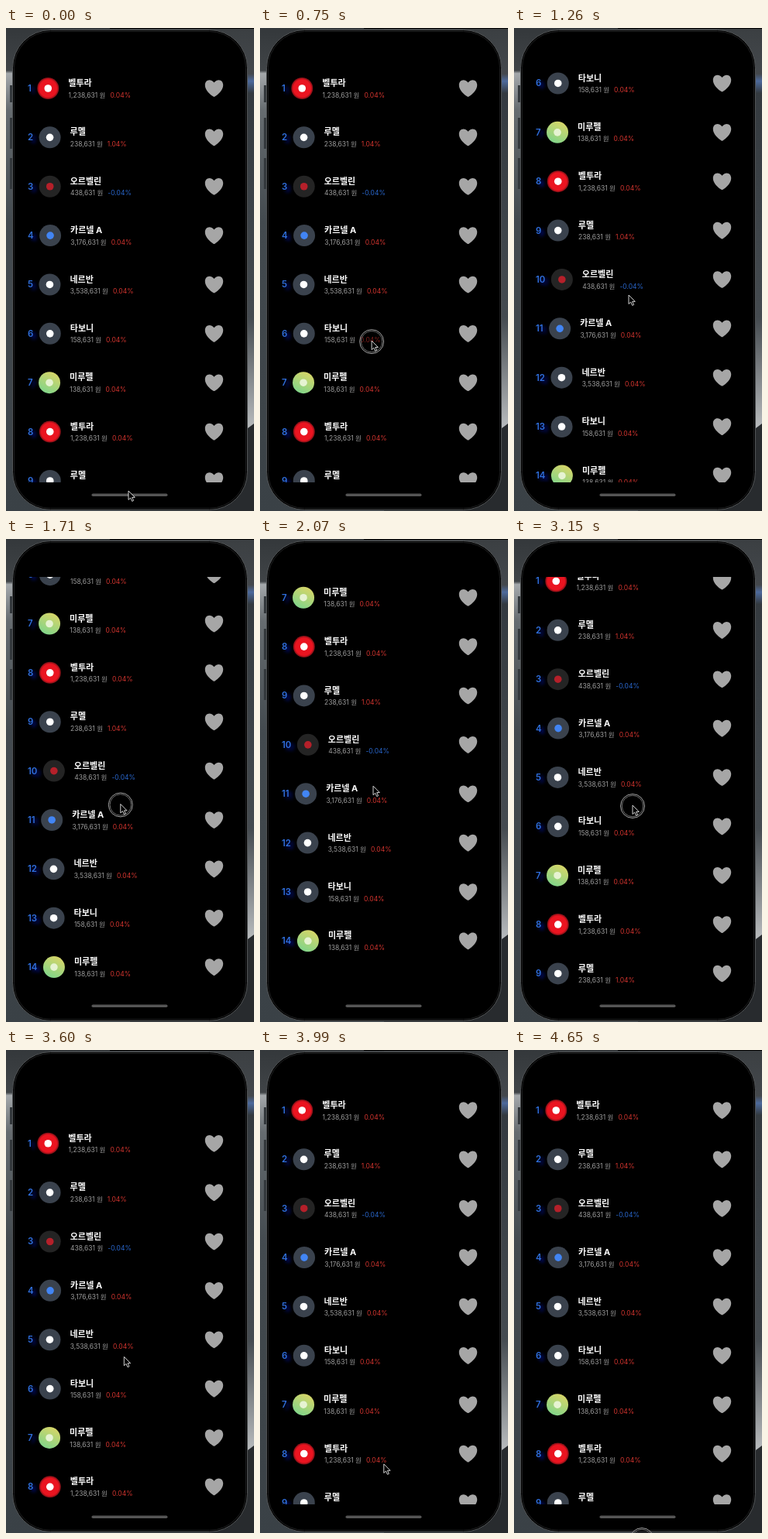
Write an HTML page that moves like this. It is 320 by 624 pixels and loops after 4.68 s.

```html
<!DOCTYPE html>
<html lang="ko">
<head>
<meta charset="utf-8">
<style>
  html, body { margin: 0; width: 100%; height: 100%; overflow: hidden; background: #000; }
  svg { display: block; width: 320px; height: 624px; }
  text { font-family: Inter, "Noto Sans CJK KR", "Noto Sans CJK", sans-serif; white-space: pre; }
  .rank { font-size: 11.5px; font-weight: 600; fill: #2f6fdc; filter: drop-shadow(4px 3px 2px #000f8c); }
  .name { font-size: 11px; font-weight: 700; fill: #fff; }
  .price { font-size: 8.5px; fill: #9c9c9c; }
  .up { fill: #d5352f; }
  .down { fill: #2a68cf; }
</style>
</head>
<body>
<svg viewBox="0 0 320 624">
  <defs>
    <linearGradient id="left" x2="0" y2="1">
      <stop offset="0" stop-color="#34383b"/><stop offset=".088" stop-color="#404447"/>
      <stop offset=".094" stop-color="#a4a8ab"/><stop offset=".17" stop-color="#666c70"/>
      <stop offset=".4" stop-color="#434a4f"/><stop offset="1" stop-color="#3a4146"/>
    </linearGradient>
    <linearGradient id="right" x2="0" y2="1">
      <stop offset="0" stop-color="#3b3f42"/><stop offset=".095" stop-color="#44484c"/>
      <stop offset=".11" stop-color="#4d6a9c"/><stop offset=".135" stop-color="#343a3f"/>
      <stop offset=".6" stop-color="#454b50"/><stop offset=".83" stop-color="#b9bcbe"/>
    </linearGradient>
    <linearGradient id="lime" x1=".8" y1="0" x2=".3" y2="1">
      <stop offset="0" stop-color="#dcd566"/><stop offset="1" stop-color="#7fd58b"/>
    </linearGradient>
    <radialGradient id="red">
      <stop offset=".8" stop-color="#ea1420"/><stop offset="1" stop-color="#7a1016"/>
    </radialGradient>
    <clipPath id="view"><path d="M10 49H310V587H10Z"/></clipPath>
  </defs>
  <path d="M0 0H160V624H0Z" fill="url(#left)"/>
  <path d="M160 0H320V624H160Z" fill="url(#right)"/>
  <path d="M300 526L320 511V624H160V600Z" fill="#282b2e"/>
  <path d="M134 0H320V1H134Z"/>
  <path d="M5 74h4v22h-4zM5 116h4v40h-4zM5 168h4v40h-4z" fill="#33383c"/>
  <rect x="8.5" y="2.5" width="303" height="620" rx="49" stroke="#55585a"/>
  <rect x="10.5" y="4.5" width="299" height="616" rx="47" stroke="#202122"/>
  <g clip-path="url(#view)"><g id="list"></g></g>
  <rect x="110.5" y="601.5" width="98" height="3.6" rx="1.8" fill="#555"/>
  <g id="pointer">
    <g id="press" fill="none">
      <circle r="15.5" fill="#000" fill-opacity=".4" stroke="#a0a0a0"/>
      <circle r="13.7" stroke="#6d6d6d"/>
    </g>
    <path d="M0 -1V10.5L2.7 8.1L4.7 12.4L6.6 11.5L4.7 7.4H8.3Z" fill="#000" stroke="#e8e8e8" stroke-width=".9"/>
  </g>
</svg>
<script>
const LOOP = 4680, ROWS = 14, PITCH = 63.37, TOP = 78, END = 346;
const byId = id => document.getElementById(id);
const list = byId('list'), pointer = byId('pointer'), press = byId('press');

const GREY = '#3a424d';
const stocks = [
  { name: '벨투라', price: '1,238,631', change: '0.04%', badge: 'url(#red)', mark: '#fff' },
  { name: '루멜', price: '238,631', change: '1.04%', badge: GREY, mark: '#fff' },
  { name: '오르벨린', price: '438,631', change: '-0.04%', badge: '#242424', mark: '#b5202a' },
  { name: '카르넬 A', price: '3,176,631', change: '0.04%', badge: GREY, mark: '#4285f4' },
  { name: '네르반', price: '3,538,631', change: '0.04%', badge: GREY, mark: '#fff' },
  { name: '타보니', price: '158,631', change: '0.04%', badge: GREY, mark: '#fff' },
  { name: '미루펠', price: '138,631', change: '0.04%', badge: 'url(#lime)', mark: '#e6f3d2' }
];

function row(i) {
  const { name, price, change, badge, mark } = stocks[i % stocks.length];
  return `<g transform="translate(0 ${TOP + i * PITCH})">
    <text class="rank" x="28" y="4">${i + 1}</text>
    <g class="stock">
      <circle r="14" fill="${badge}"/><circle r="4.8" fill="${mark}"/>
      <text class="name" x="26" y="-2.9">${name}</text>
      <text class="price" x="26.3" y="11.6">${price} 원<tspan dx="6" class="${change[0] === '-' ? 'down' : 'up'}">${change}</tspan></text>
    </g>
    <path transform="translate(268.5 0)" fill="#a6a6a6" d="M0 -7.5C-2 -10 -4 -10.8 -6 -10.8C-9.3 -10.8 -11.7 -8 -11.7 -4.3C-11.7 2.3 -5 8 -1 10.6Q0 11.2 1 10.6C5 8 11.7 2.3 11.7 -4.3C11.7 -8 9.3 -10.8 6 -10.8C4 -10.8 2 -10 0 -7.5Z"/>
  </g>`;
}

list.innerHTML = Array.from({ length: ROWS }, (_, i) => row(i)).join('');

// Each stock follows the width of its rank number
for (const stock of list.querySelectorAll('.stock')) {
  const width = stock.previousElementSibling.getComputedTextLength();
  stock.setAttribute('transform', `translate(${28 + width + 21.4} 0)`);
}

// Progress of a flick that speeds up, then glides to rest
function flick(t, start) {
  const u = Math.max(0, t - start) / 108;
  return 1 - (1 + u) * Math.exp(-u);
}

// Pull past the edge of the list and back
function overscroll(t, start) {
  const u = Math.min(1, Math.max(0, (t - start) / 740));
  return Math.sin(Math.PI * u) ** 2;
}

const scroll = t =>
  END * (flick(t, 783) - flick(t, 2687)) + 39 * overscroll(t, 1640) - 57 * overscroll(t, 3110);

// Stops of the pointer; `down` marks a press held on the way to that stop
const stops = [
  { t: 0, x: 158, y: 599 },
  { t: 720, x: 144, y: 411 },
  { t: 930, x: 146, y: 305, down: true },
  { t: 1250, x: 148, y: 346 },
  { t: 1640, x: 148, y: 346 },
  { t: 2000, x: 146, y: 320, down: true },
  { t: 2690, x: 147, y: 326 },
  { t: 2900, x: 156, y: 504, down: true },
  { t: 3150, x: 153, y: 345 },
  { t: 3520, x: 152, y: 391, down: true },
  { t: 4350, x: 165, y: 633 },
  { t: 4560, x: 165, y: 633 },
  { t: LOOP, x: 165, y: 633, down: true }
];

function pointerAt(t) {
  const i = stops.findIndex(stop => stop.t > t);
  const a = stops[i - 1], b = stops[i];
  const u = (t - a.t) / (b.t - a.t), k = u * u * (3 - 2 * u);
  return { x: a.x + (b.x - a.x) * k, y: a.y + (b.y - a.y) * k, down: b.down };
}

function draw(t) {
  const { x, y, down } = pointerAt(t);
  list.setAttribute('transform', `translate(0 ${-scroll(t)})`);
  pointer.setAttribute('transform', `translate(${x} ${y})`);
  press.setAttribute('visibility', down ? 'visible' : 'hidden');
}

let start;
function tick(now) {
  start ??= now;
  draw((now - start) % LOOP);
  requestAnimationFrame(tick);
}
draw(0);
requestAnimationFrame(tick);
</script>
</body>
</html>
```
